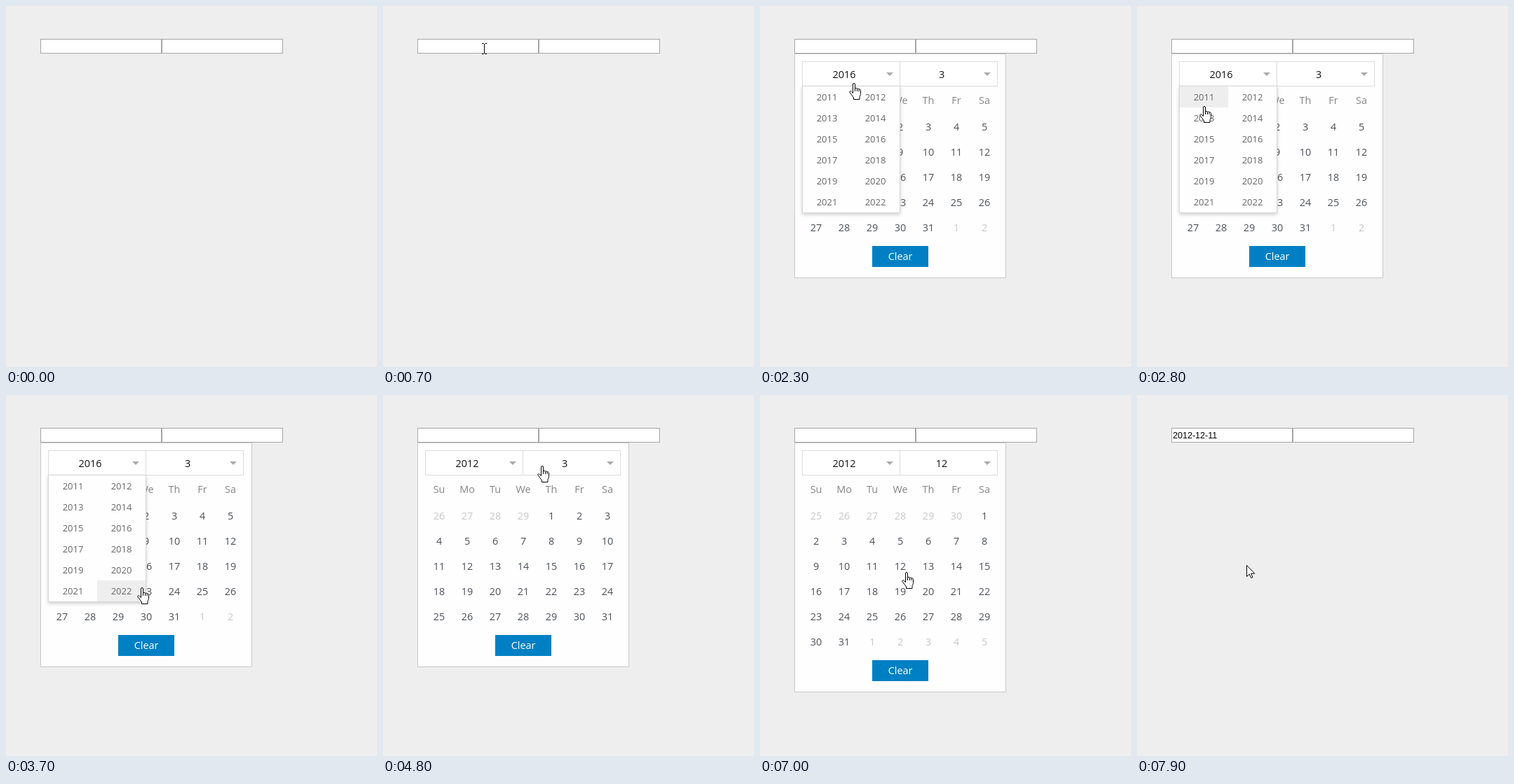
Animation, 529 px wide and 516 px high, one loop 8000 ms. Source, as an HTML page with a canvas:

```html
<!DOCTYPE html>
<html lang="en">
<head>
<meta charset="utf-8">
<title>Date picker</title>
<style>
  html, body { margin: 0; width: 100%; height: 100%; overflow: hidden; background: #eee; }
  canvas { display: block; }
</style>
</head>
<body>
<canvas id="stage" width="529" height="516"></canvas>
<script>
const ctx = document.getElementById('stage').getContext('2d');
const LOOP = 8000, STEP = 100;
const UI_FONT = '"Open Sans", "Noto Sans", sans-serif';
const INPUT_FONT = '"Liberation Sans", Arial, sans-serif';

// Pointer hotspot: [time, x, y]
const pointerKeys = [
  [100, 188, 74], [400, 158, 64], [700, 144, 61],
  [1300, 144, 61], [1600, 110, 121], [1800, 116, 146], [2200, 133, 106],
  [2300, 133, 110], [2500, 118, 146], [2800, 95, 143], [3100, 95, 244], [3300, 96, 276],
  [3400, 96, 276], [3700, 193, 275], [4100, 166, 128],
  [4500, 166, 128], [4800, 226, 101], [4900, 258, 99],
  [5100, 258, 99], [5200, 260, 95], [5700, 247, 225], [5850, 250, 272], [6000, 318, 274],
  [6100, 318, 274], [6200, 295, 270],
  [6500, 295, 270], [7300, 156, 243], [8000, 156, 243]
];

const cursors = {
  arrow: {
    body: new Path2D('M.5.5V16.5L4.3 13 6.8 18.5 9 17.5 6.6 12.2H11.8Z'), dx: 0
  },
  hand: {
    body: new Path2D('M5.5 14.5V2a1.5 1.5 0 0 1 3 0v6c.2-1 2.8-1 3 .5c.3-1 2.4-.7 2.6.7' +
      'c.4-.8 2.4-.4 2.4 1.3v5c0 2-1.5 3.5-1.5 5V23.5H6.5V21C5 18.5 2.5 16 1 13.5c-.7-1.3 1-2.5 2.2-1.3z'),
    lines: new Path2D('M8.5 8v4M11.5 8.5V12M14.1 9.2v3'), dx: -6
  },
  text: {
    lines: new Path2D('M-3-7.5H-.5M1.5-7.5H4M.5-7V7M-3 7.5H-.5M1.5 7.5H4'), dx: 0
  }
};

function pointerAt(t) {
  const i = pointerKeys.findIndex(k => k[0] > t);
  const [t0, x0, y0] = pointerKeys[i - 1], [t1, x1, y1] = pointerKeys[i];
  const p = (t - t0) / (t1 - t0);
  return { x: Math.round(x0 + (x1 - x0) * p), y: Math.round(y0 + (y1 - y0) * p) };
}

function box(x, y, w, h, fill, stroke) {
  ctx.fillStyle = fill;
  ctx.fillRect(x, y, w, h);
  if (stroke) {
    ctx.strokeStyle = stroke;
    ctx.lineWidth = 1;
    ctx.strokeRect(x + .5, y + .5, w - 1, h - 1);
  }
}

function label(text, x, y, color, size = 14.4, weight = 400) {
  ctx.font = `${weight} ${size}px ${UI_FONT}`;
  ctx.textAlign = 'center';
  ctx.fillStyle = color;
  ctx.fillText(text, x, y + 5);
}

function drawInputs(value, focused, caret) {
  box(222, 47, 173, 21, '#fff', '#a5a5a5');
  box(49, 47, 173, 21, '#fff', focused ? '#5b9bf0' : '#a5a5a5');
  if (focused) {
    ctx.strokeStyle = 'rgba(77,144,254,.35)';
    ctx.strokeRect(48.5, 46.5, 174, 22);
  }
  ctx.font = `12.55px ${INPUT_FONT}`;
  ctx.textAlign = 'left';
  ctx.fillStyle = '#000';
  ctx.fillText(value, 51, 62);
  if (caret) ctx.fillRect(51, 50, 1, 15);
}

function drawSelect(x, width, text) {
  box(x, 79, width, 36, '#fff', '#dcdcdc');
  label(text, x + 60, 98, '#111');
  ctx.fillStyle = '#aaa';
  ctx.beginPath();
  ctx.moveTo(x + 120, 95);
  ctx.lineTo(x + 130, 95);
  ctx.lineTo(x + 125, 100);
  ctx.fill();
}

function drawCalendar(year, month) {
  const offset = new Date(year, month - 1, 1).getDay();
  const days = new Date(year, month, 0).getDate();
  const rows = Math.ceil((offset + days) / 7);
  const bottom = 173 + rows * 36;

  box(49, 68, 302, bottom - 32, '#fefefe', '#c9c9c9');
  drawSelect(60, 140, year);
  drawSelect(199, 140, month);
  ['Su', 'Mo', 'Tu', 'We', 'Th', 'Fr', 'Sa'].forEach((d, i) => label(d, 80 + 40 * i, 135, '#858585'));

  for (let i = 0; i < rows * 7; i++) {
    const day = i - offset + 1;
    const inMonth = day > 0 && day <= days;
    const today = year === 2016 && month === 3 && day === 1;
    const color = today ? '#0080c6' : inMonth ? '#4c5157' : '#c8c8c8';
    label(new Date(year, month - 1, day).getDate(),
      80 + 40 * (i % 7), 173 + 36 * Math.floor(i / 7), color, 14.4, today ? 700 : 400);
  }
  box(160, bottom - 10, 80, 30, '#0080c4');
  label('Clear', 200, bottom + 5, '#fff');
}

function drawMenu(x, centers, textAt, pointer) {
  ctx.save();
  ctx.shadowColor = 'rgba(0,0,0,.2)';
  ctx.shadowBlur = 5;
  ctx.shadowOffsetY = 2;
  box(x, 114, 140, 182, '#fff');
  ctx.restore();
  box(x, 114, 140, 182, '#fefefe', '#d8d8d8');
  for (let row = 0; row < 6; row++) {
    for (let col = 0; col < 2; col++) {
      const left = x + 1 + 69 * col, top = 115 + 30 * row;
      const hovered = pointer.x >= left && pointer.x < left + 69 && pointer.y >= top && pointer.y < top + 30;
      if (hovered) box(left, top, 69, 30, '#eee');
      label(textAt(row, col), centers[col], top + 15, '#666', 13);
    }
  }
}

function drawPointer({ x, y }, kind) {
  const { body, lines, dx } = cursors[kind];
  ctx.save();
  ctx.translate(x + dx, y);
  ctx.lineWidth = 1;
  ctx.lineJoin = 'round';
  ctx.strokeStyle = '#000';
  ctx.fillStyle = '#fff';
  if (body) {
    ctx.fill(body);
    ctx.stroke(body);
  }
  if (lines) ctx.stroke(lines);
  ctx.restore();
}

function draw(t) {
  const between = (a, b) => t >= a && t < b;
  const open = between(900, 7900);
  const pointer = t >= 100 ? pointerAt(t) : null;

  box(0, 0, 529, 516, '#eee');
  drawInputs(t >= 7900 ? '2012-12-11' : '', between(900, 2300), between(900, 1400) || between(1900, 2300));
  if (open) drawCalendar(t < 4600 ? 2016 : 2012, t < 6600 ? 3 : 12);
  if (between(2300, 4600)) drawMenu(60, [95.5, 164.5], (r, c) => 2011 + 2 * r + c, pointer);
  if (between(5200, 6600)) drawMenu(199, [238, 303.5], (r, c) => 1 + r + 6 * c, pointer);
  if (pointer) drawPointer(pointer, pointer.y < 68 ? 'text' : open ? 'hand' : 'arrow');
}

const start = performance.now();
function tick() {
  const t = (performance.now() - start) % LOOP;
  draw(Math.floor(t / STEP) * STEP);
  requestAnimationFrame(tick);
}
tick();
</script>
</body>
</html>
```
